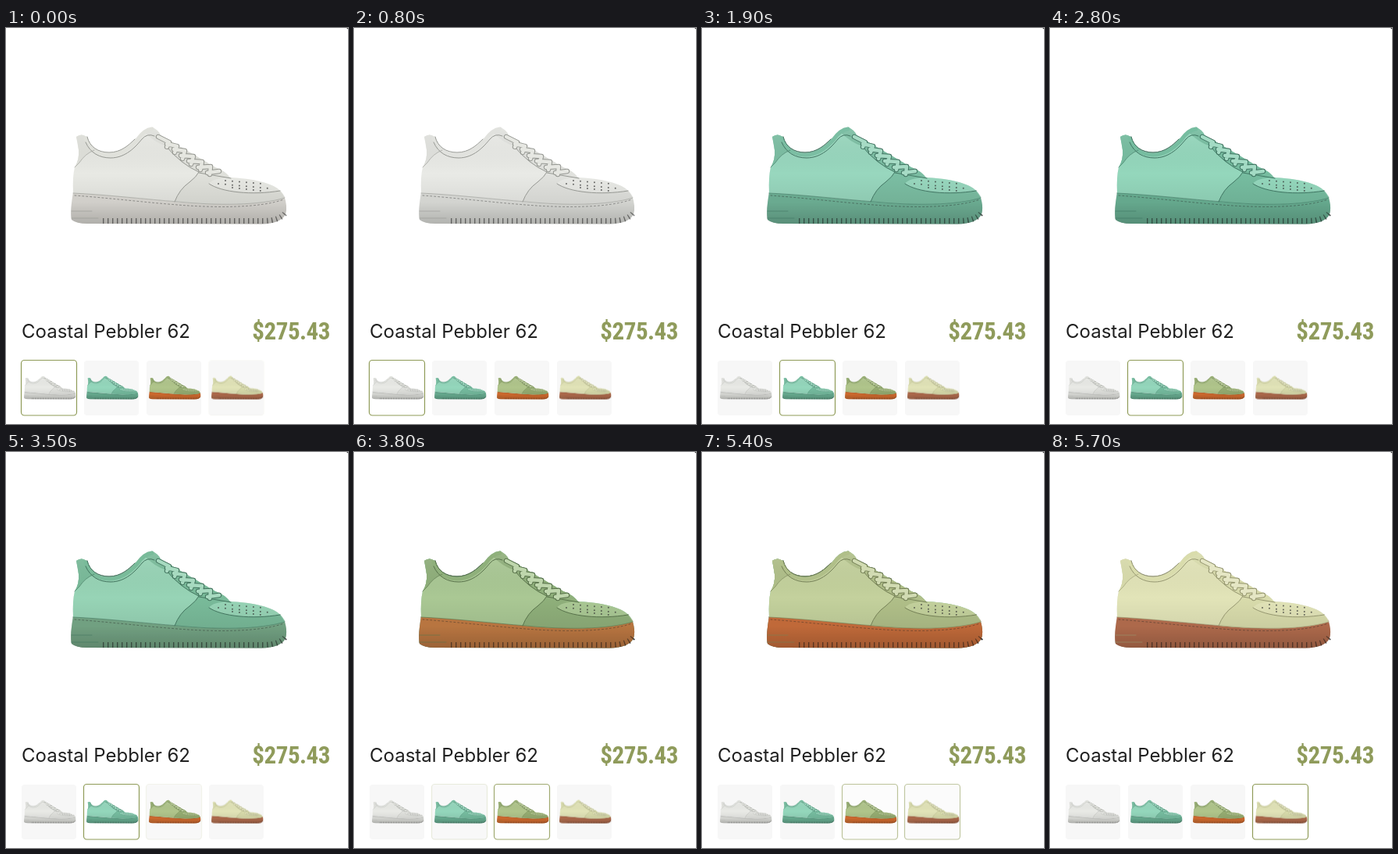
Write an HTML page that moves like this. It is 438 px wide and 506 px high and loops after 6 s.

```html
<!DOCTYPE html>
<html lang="en">
<head>
<meta charset="utf-8">
<title>Shoe colour picker</title>
<style>
  html, body { margin: 0; width: 100%; height: 100%; overflow: hidden; background: #fff; }
  svg { display: block; width: 438px; height: 506px; }

  .white { --upper: #e9eae6; --over: #e1e2de; --sole: #d3d4d0; --line: #969893; --lace: #e6e7e2; }
  .mint  { --upper: #94d7bc; --over: #76bda0; --sole: #65a88d; --line: #3f7562; --lace: #a3dbc4; }
  .green { --upper: #b0c58b; --over: #96ad72; --sole: #cd692e; --line: #5f7245; --lace: #c5d5a7; }
  .cream { --upper: #e2e4b8; --over: #d9dcac; --sole: #ad694b; --line: #969770; --lace: #e5e6c4; }

  .upper { fill: var(--upper); }
  .over  { fill: var(--over); }
  .sole  { fill: var(--sole); }
  .seam, .lace, .collar, .holes, .tread, .stitch { fill: none; stroke-linecap: round; stroke-linejoin: round; }
  .seam   { stroke: var(--line); stroke-width: 1; }
  .collar { stroke: var(--over); stroke-width: 5; }
  .lace   { stroke: var(--lace); stroke-width: 4.4; }
  .lace.edge { stroke: var(--line); stroke-width: 6.4; }
  .holes  { stroke: #333; stroke-opacity: .7; stroke-width: 2; stroke-dasharray: 0 9; }
  .stitch { stroke: #222; stroke-opacity: .4; stroke-width: 1; stroke-dasharray: 2 3; }
  .tread  { stroke: #111; stroke-opacity: .5; stroke-width: 7; stroke-linecap: butt; stroke-dasharray: 1.4 4.6; }

  .tile { fill: #f7f7f7; }
  .ring { fill: #fff; stroke: #8f9b58; stroke-width: 1.2; }

  .title { font: 400 24px Inter, "Open Sans", sans-serif; fill: #1f1f1f; }
  .price {
    font: 700 31px "Liberation Sans Narrow", "Roboto Condensed", Roboto, sans-serif;
    font-stretch: 75%; letter-spacing: -.5px; fill: #8f9b5b; text-anchor: end;
  }

  .fade { animation: 6s step-end infinite; }
  .mint-in  { animation-name: mint-in; }
  .green-in { animation-name: green-in; }
  .cream-in { animation-name: cream-in; }
  .pick1 { animation-name: pick1; }
  .pick2 { animation-name: pick2; }
  .pick3 { animation-name: pick3; }
  .pick4 { animation-name: pick4; }

  /* Colours blend in 100 ms steps; 1.667% is 100 ms. */
  @keyframes mint-in {
    0%, 95%, 100% { opacity: 0 }
    28.333% { opacity: .5 } 30% { opacity: .8 } 31.667% { opacity: .95 } 33.333% { opacity: 1 }
  }
  @keyframes green-in {
    0%, 95%, 100% { opacity: 0 }
    58.333% { opacity: .12 } 61.667% { opacity: .5 } 63.333% { opacity: .8 }
    65% { opacity: .95 } 66.667% { opacity: 1 }
  }
  @keyframes cream-in {
    0% { opacity: .04 } 1.667% { opacity: .03 } 3.333% { opacity: .01 } 5% { opacity: 0 }
    90% { opacity: .4 } 91.667% { opacity: .75 } 93.333% { opacity: .93 } 95%, 100% { opacity: 1 }
  }
  @keyframes pick1 {
    0% { opacity: 1 } 28.333% { opacity: .55 } 30% { opacity: .2 } 31.667%, 95% { opacity: 0 } 100% { opacity: 1 }
  }
  @keyframes pick2 {
    0%, 100% { opacity: 0 } 28.333% { opacity: .55 } 30% { opacity: .85 } 31.667% { opacity: 1 }
    61.667% { opacity: .5 } 63.333% { opacity: .2 } 65% { opacity: 0 }
  }
  @keyframes pick3 {
    0%, 100% { opacity: 0 } 58.333% { opacity: .12 } 61.667% { opacity: .55 } 63.333% { opacity: .85 } 65% { opacity: 1 }
    90% { opacity: .6 } 91.667% { opacity: .25 } 93.333% { opacity: 0 }
  }
  @keyframes pick4 {
    0% { opacity: .04 } 1.667% { opacity: 0 }
    90% { opacity: .55 } 91.667% { opacity: .85 } 93.333%, 100% { opacity: 1 }
  }
</style>
</head>
<body>
<svg viewBox="0 0 438 506">
  <defs>
    <linearGradient id="shade" x1="0" y1="0" x2="0" y2="1">
      <stop offset="0" stop-color="#fff" stop-opacity=".1"/>
      <stop offset=".6" stop-color="#000" stop-opacity="0"/>
      <stop offset="1" stop-color="#000" stop-opacity=".07"/>
    </linearGradient>
    <linearGradient id="base" x1="0" y1="0" x2="0" y2="1">
      <stop offset=".3" stop-color="#000" stop-opacity="0"/>
      <stop offset="1" stop-color="#000" stop-opacity=".16"/>
    </linearGradient>
    <filter id="soft" x="-10%" y="-200%" width="120%" height="500%"><feGaussianBlur stdDeviation="1.6"/></filter>

    <path id="sole" d="M86 210C130 213 180 219 220 222C270 226 325 226 356 214Q361 228 358 238Q352 250 327 250.500L104 250Q90 250 84 245C82 236 84 222 86 210Z"/>
    <path id="upper" d="M90 139Q97 134 103 139C106 153 117 162 132 163C148 163 160 152 168 143Q178 128 187 127Q195 130 198 137L268 178Q280 182 286 191C312 192 338 197 349 206Q356 212 357 217C325 227 270 227 220 222C180 219 130 213 86 211Q85 190 88 178Q94 168 93 156Q92 146 90 139Z"/>
    <path id="laces" d="M195 139L209 146M206 148L219 151M215 155L229 157M224 163L240 164M234 170L251 171M246 178L262 177M258 185L273 183M209 146L206 152M219 151L216 159M229 157L226 167M240 164L237 174M251 171L249 181M262 177L261 187"/>
    <path id="floor" d="M86 249H352" stroke="#111" stroke-opacity=".7" stroke-width="3" filter="url(#soft)"/>

    <g id="shoe">
      <use href="#sole" class="sole"/>
      <use href="#sole" fill="url(#base)"/>
      <path class="tread" d="M124 246.500H330Q350 246 357 237"/>
      <path class="stitch" d="M88 214C130 217 180 223 220 226C270 230 325 230 356 219"/>
      <path class="seam" opacity=".6" d="M84 234H110M84 243H118"/>

      <use href="#upper" class="upper"/>
      <path class="over" d="M90 139Q97 134 103 139Q105 149 113 156Q101 161 94 172L88 178Q94 168 93 156Z"/>
      <path class="over" d="M216 222Q222 206 235 197Q244 190 247 184L270 181L286 191Q264 192 260 199C276 210 315 214 351 208L357 217C325 227 270 227 216 222Z"/>
      <path class="over" d="M176 132L187 127Q195 130 198 137L268 178Q280 182 288 192L250 186Q224 174 205 151Q190 146 176 132Z"/>
      <use href="#upper" fill="url(#shade)"/>

      <path class="collar" d="M102 141C107 155 118 162 132 162C148 162 160 152 168 143Q177 130 187 129"/>
      <path class="seam" d="M104 139C107 152 118 159 132 159C147 159 157 150 165 142M102 146C108 160 120 166 134 166C153 166 166 152 174 142Q181 134 190 138"/>
      <path class="seam" d="M216 222Q222 206 235 197Q244 190 247 184Q224 174 205 151M247 185L288 192M260 199C276 210 315 214 351 208"/>
      <path class="seam" opacity=".6" d="M113 156Q101 161 94 172L88 178M86 211C130 213 180 219 220 222C270 227 325 227 357 217"/>
      <path class="holes" d="M272 199L338 205M281 195L330 199M290 204L326 208"/>
      <use href="#laces" class="lace edge"/>
      <use href="#laces" class="lace"/>
    </g>
    <g id="mini" transform="translate(3.100 414.300) scale(.24)">
      <use href="#floor"/>
      <use href="#shoe"/>
    </g>
    <rect id="tile" x="20" y="425" width="70" height="70" rx="4"/>
    <rect id="ring" x="19.500" y="424.500" width="71" height="70.500" rx="4"/>
  </defs>

  <rect width="438" height="506" fill="#fff"/>
  <path d="M436 0H438V1.500Z" fill="#333"/>

  <use href="#floor"/>
  <use href="#shoe" class="white"/>
  <use href="#shoe" class="mint fade mint-in"/>
  <use href="#shoe" class="green fade green-in"/>
  <use href="#shoe" class="cream fade cream-in"/>

  <text class="title" x="20" y="396">Coastal Pebbler 62</text>
  <text class="price" x="415" y="398">$275.43</text>

  <g class="white">
    <use href="#tile" class="tile"/>
    <use href="#ring" class="ring fade pick1"/>
    <use href="#mini"/>
  </g>
  <g class="mint" transform="translate(80)">
    <use href="#tile" class="tile"/>
    <use href="#ring" class="ring fade pick2"/>
    <use href="#mini"/>
  </g>
  <g class="green" transform="translate(160)">
    <use href="#tile" class="tile"/>
    <use href="#ring" class="ring fade pick3"/>
    <use href="#mini"/>
  </g>
  <g class="cream" transform="translate(240)">
    <use href="#tile" class="tile"/>
    <use href="#ring" class="ring fade pick4"/>
    <use href="#mini"/>
  </g>
</svg>
</body>
</html>
```
